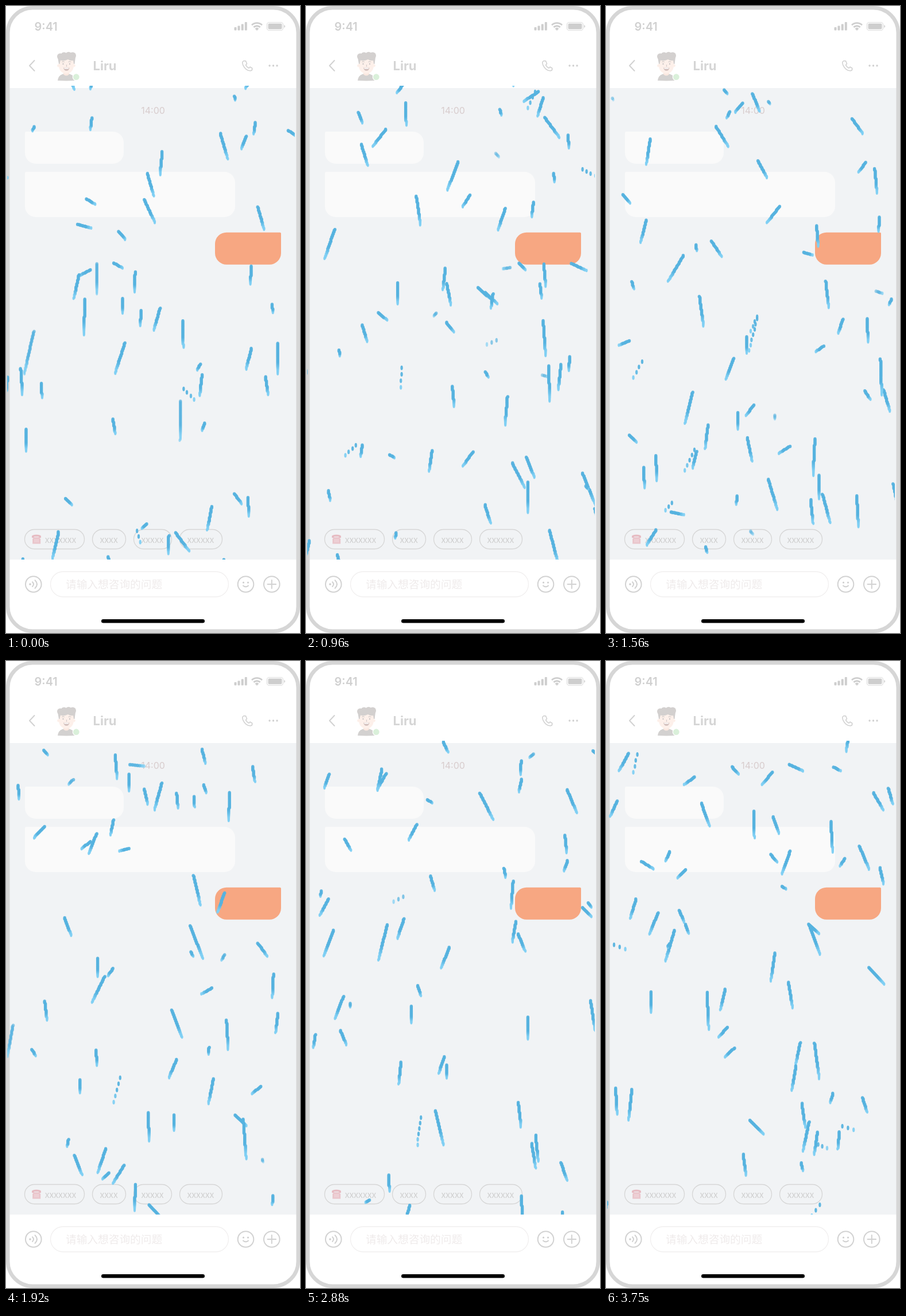
An HTML page with a canvas that plays this animation: 512x1093 px, repeating every 3780 ms.

```html
<!DOCTYPE html>
<html lang="zh">
<head>
<meta charset="utf-8">
<title>Chat with rain</title>
<style>
html, body { margin: 0; width: 100%; height: 100%; overflow: hidden; background: #fff; }
svg, canvas { position: absolute; left: 0; top: 0; width: 512px; height: 1093px; display: block; }
text { font-family: Inter, Roboto, sans-serif; }
.cjk { font-family: "Noto Sans CJK SC", "Noto Sans CJK", "Noto Sans", sans-serif; font-weight: 300; }
.line { fill: none; stroke: #d2d2d2; stroke-width: 2; stroke-linecap: round; stroke-linejoin: round; }
.thin { stroke-width: 1.6; }
.chip { fill: none; stroke: #d6d6d6; stroke-width: 1.3; }
</style>
</head>
<body>
<svg viewBox="0 0 512 1093">
  <rect x="6" y="143" width="500" height="822" fill="#f1f3f5"/>
  <rect x="3.25" y="3.25" width="505.5" height="1086.5" rx="43" fill="none" stroke="#d6d6d6" stroke-width="6.5"/>

  <!-- status bar -->
  <text x="49.5" y="42.8" font-size="20" font-weight="600" fill="#d0d0d0">9:41</text>
  <g fill="#cecece">
    <rect x="397.5" y="37" width="4" height="5.5" rx="1"/>
    <rect x="403.5" y="34.5" width="4" height="8" rx="1"/>
    <rect x="409.7" y="31.5" width="4" height="11" rx="1"/>
    <rect x="415.8" y="28" width="4" height="14.5" rx="1"/>
    <path d="M437 43l-3.4-3.6a5 5 0 0 1 6.8 0z"/>
    <rect x="456.5" y="30.5" width="24" height="10" rx="2"/>
    <path d="M484.3 33v5q1.8-.7 1.8-2.5t-1.8-2.5z"/>
  </g>
  <g fill="none" stroke="#cecece">
    <path d="M428 33.2a13 13 0 0 1 18 0M431.3 37a8.4 8.4 0 0 1 11.4 0" stroke-width="2.8"/>
    <rect x="454.5" y="28.5" width="28" height="14" rx="4" stroke="#dedede" stroke-width="1.2"/>
  </g>

  <!-- header -->
  <path class="line" d="M49.5 95L41 104l8.5 9"/>
  <g>
    <path d="M90 130q1-9 9-11.500h12q8 2.500 9 11.500q-15 .8-30 0z" fill="#d3d1d0"/>
    <path d="M100 113h10v6q-5 5-10 0z" fill="#fae8e0"/>
    <g fill="#fdf0ea">
      <circle cx="91.500" cy="104" r="2.400"/>
      <circle cx="118.500" cy="104" r="2.400"/>
      <path d="M92 93h26v11q-1 13-13 14q-12-1-13-14z"/>
    </g>
    <g fill="#d3d0cf">
      <circle cx="94.500" cy="88" r="5.500"/>
      <circle cx="101" cy="86" r="5.500"/>
      <circle cx="109" cy="86" r="6"/>
      <circle cx="116" cy="86.500" r="6"/>
      <path d="M90 89h31l-1.500 12h-1.500l-1-6q-5 1-9-2q-7 4-13 1.500l-1.500 6.500h-1.500z"/>
    </g>
    <path d="M97.500 97.500q2-1.200 4 0M109 97.500q2-1.200 4 0M105.500 102.500v3" fill="none" stroke="#d6cecb" stroke-width="1.200" stroke-linecap="round"/>
    <circle cx="99.500" cy="101" r="1.200" fill="#cac6c5"/>
    <circle cx="111" cy="101" r="1.200" fill="#cac6c5"/>
    <path d="M100 107.500h10.500q-1 5.500-5.200 5.500t-5.300-5.500z" fill="#d5c2bf"/>
    <path d="M101 107.800h8.500l-.8 1.700h-7z" fill="#fff"/>
    <circle cx="122.300" cy="123.700" r="6" fill="#daf0da" stroke="#fff" stroke-width="1.300"/>
  </g>
  <text x="151.500" y="112" font-size="22" font-weight="700" fill="#d5d5d5">Liru</text>
  <path class="line thin" d="M414.500 95.500l3 .4 2 4.600-2 2.400q2 3.800 5.500 5.300l2.200-2 3.500 2.300q.6 3.800-3 4.500-8.500-.4-13-10.200-2.500-6 1.800-7.300z"/>
  <g fill="#d0d0d0">
    <circle cx="459" cy="104" r="1.700"/><circle cx="465.500" cy="104" r="1.700"/><circle cx="472" cy="104" r="1.700"/>
  </g>

  <!-- messages -->
  <text x="256" y="187.500" font-size="16" text-anchor="middle" fill="#d8cccd">14:00</text>
  <g fill="#fafafa">
    <path d="M35 219H186a19 19 0 0 1 19 19V256a19 19 0 0 1-19 19H52a19 19 0 0 1-19-19V221a2 2 0 0 1 2-2z"/>
    <path d="M35 289H380a19 19 0 0 1 19 19V349a19 19 0 0 1-19 19H52a19 19 0 0 1-19-19V291a2 2 0 0 1 2-2z"/>
  </g>
  <path d="M384 394.700H477a2 2 0 0 1 2 2V430.700a20 20 0 0 1-20 20H384a20 20 0 0 1-20-20V414.700a20 20 0 0 1 20-20z" fill="#f7a782"/>

  <!-- quick replies -->
  <rect class="chip" x="32.500" y="912.500" width="104" height="34" rx="17"/>
  <rect class="chip" x="150.500" y="912.500" width="58" height="34" rx="17"/>
  <rect class="chip" x="222.500" y="912.500" width="66" height="34" rx="17"/>
  <rect class="chip" x="302.500" y="912.500" width="74" height="34" rx="17"/>
  <path d="M45 927v-3q1-2.500 8-2.500t8 2.500v3h-4v-2h-8v2z" fill="#e6bcc3"/>
  <path d="M48.500 926h9l2.700 3v8.500h-14v-8.500z" fill="#eac6cc"/>
  <path d="M50.500 929v6M53.200 929v6M55.900 929v6" stroke="#f3dfe3"/>
  <g font-size="15.700" fill="#d0d0d0">
    <text class="cjk" x="67.700" y="936">xxxxxxx</text>
    <text class="cjk" x="163.500" y="936">xxxx</text>
    <text class="cjk" x="235.500" y="936">xxxxx</text>
    <text class="cjk" x="315.500" y="936">xxxxxx</text>
  </g>

  <!-- input bar -->
  <g class="line">
    <circle cx="47.800" cy="1008" r="13.800"/>
    <path d="M46 1004q4 4 0 8M50.500 1001q7 7 0 14"/>
    <circle cx="417.500" cy="1008" r="13.800"/>
    <path d="M413 1010.500q4.500 3.800 9 0"/>
    <circle cx="462.800" cy="1008" r="13.800"/>
    <path d="M455.500 1008h14.600M462.800 1000.700v14.600"/>
  </g>
  <g fill="#cecece">
    <circle cx="42" cy="1008" r="1.800"/>
    <circle cx="413.500" cy="1005" r="1.600"/><circle cx="421.500" cy="1005" r="1.600"/>
  </g>
  <rect x="77.500" y="986" width="310" height="44" rx="22" fill="#fff" stroke="#f1efef" stroke-width="1.300"/>
  <text class="cjk" x="104" y="1014.500" font-size="18.700" fill="#efebeb">请输入想咨询的问题</text>
  <rect x="166" y="1069" width="180" height="6.600" rx="3.300" fill="#000"/>
</svg>
<canvas id="rain" width="512" height="1093"></canvas>
<script>
const ctx = document.getElementById('rain').getContext('2d');
const LOOP = 3780, DROPS = 92, BLUR = 0.06;
const DARK = [86, 178, 223], LIGHT = [128, 207, 243];

function random(seed) {
  let a = seed | 0;
  return () => {
    a = (a + 0x6D2B79F5) | 0;
    let h = Math.imul(a ^ (a >>> 15), 1 | a);
    h = (h + Math.imul(h ^ (h >>> 7), 61 | h)) ^ h;
    return ((h ^ (h >>> 14)) >>> 0) / 4294967296;
  };
}

const clamp = v => Math.min(1, Math.max(0, v));
const mix = f => `rgb(${DARK.map((d, i) => Math.round(d + (LIGHT[i] - d) * f))})`;
const snap = (v, grid) => Math.round(v / grid) * grid;

// Five pictures per 180 ms; the first is held twice as long.
function pictureIndex(ms) {
  const part = ms % 180;
  return Math.floor(ms / 180) * 5 + Math.max(0, Math.floor(part / 30) - 1);
}

// A row of overlapping beads, dark at the top and lighter at the lower tip.
function streak(x, y, dx, dy, broken, alpha) {
  const n = Math.max(1, Math.round(Math.hypot(dx, dy) / (broken ? 10 : 2)));
  ctx.globalAlpha = alpha;
  for (let i = n; i >= 0; i--) {
    const f = i / n;
    const w = broken ? 0.8 : 1 - 0.25 * clamp((f - 0.75) * 4);
    ctx.fillStyle = mix(clamp((f - 0.6) / 0.25));
    ctx.beginPath();
    ctx.ellipse(snap(x + dx * (f - 1), 1.4), y + dy * (f - 1), 2.7 * w, broken ? 4 : 3, 0, 0, Math.PI * 2);
    ctx.fill();
  }
}

// Each drop starts with a random push and is pulled down by gravity.
function drop(slot, t) {
  const own = random(slot * 7919 + 17);
  const life = 0.85 + own() * 0.4;
  const clock = t + own() * life;
  const cycle = Math.floor(clock / life);
  const age = clock - cycle * life;
  const r = random(slot * 977 + cycle * 13007 + 5);
  const x0 = -15 + r() * 540, y0 = -80 + r() * 1030;
  const vx = (r() + r() - 1) * 470, vy = r() * 120;
  const g = 680 + r() * 420;
  const broken = r() < 0.05;
  const fade = Math.min(1, 0.4 + age * 10, 0.4 + (life - age) * 20);
  streak(x0 + vx * age, y0 + vy * age + g * age * age / 2,
    vx * BLUR, (vy + g * age) * BLUR, broken, 0.94 * fade);
}

function draw(ms) {
  const t = pictureIndex(ms) * 0.036;
  ctx.clearRect(0, 0, 512, 1093);
  ctx.save();
  ctx.beginPath();
  ctx.rect(2, 139, 501, 826);
  ctx.clip();
  for (let i = 0; i < DROPS; i++) drop(i, t);
  ctx.restore();
}

const start = performance.now();
function tick() {
  draw((performance.now() - start) % LOOP);
  requestAnimationFrame(tick);
}
tick();
</script>
</body>
</html>
```
